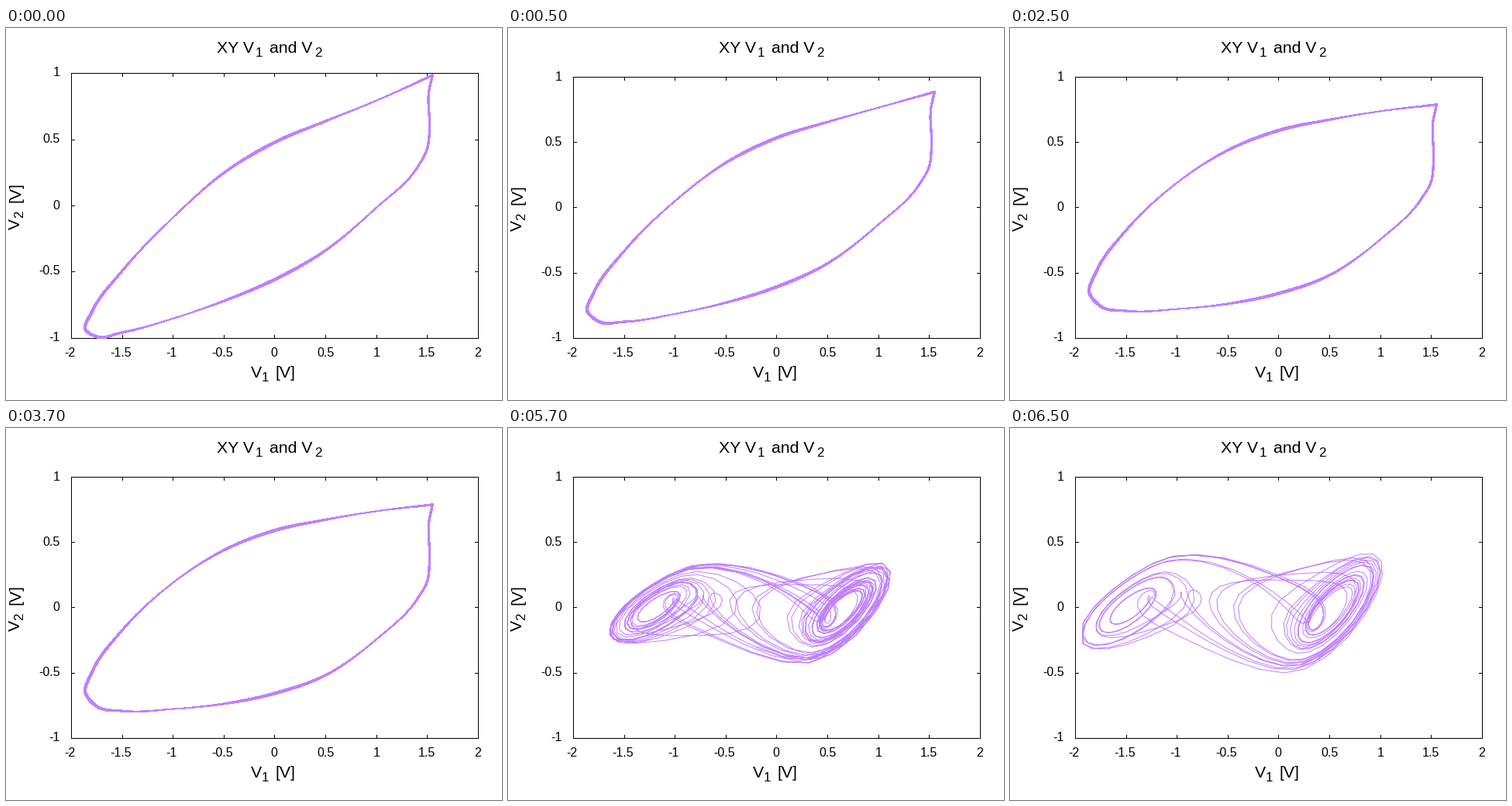
A matplotlib script that plays this animation: 640 px wide and 480 px high, repeating every 8 s.

```python
import numpy as np
import matplotlib.pyplot as plt
from matplotlib.animation import FuncAnimation
from matplotlib.collections import LineCollection

W, H, DPI = 640, 480, 100
PX = 72 / DPI
PURPLE = "#c080ff"
LEFT, RIGHT, BOTTOM = 84, 609, 400
STEP = 500
STARTS = [0, 500, 2500, 4500, 6500]
BIG, SUB, SMALL = 21.33, 17, 16

# Limit cycle: V1, then V2 at amplitude 0.8 and at amplitude 1.0.
CYCLE = np.array([
    (1.55, .79, .985), (1, .74, .795), (.5, .675, .64), (0, .593, .48),
    (-.5, .442, .25), (-1, .193, -.087), (-1.5, -.17, -.49),
    (-1.8, -.495, -.80), (-1.865, -.645, -.93), (-1.76, -.75, -.985),
    (-1.5, -.79, -.955), (-1, -.775, -.85), (-.5, -.735, -.717),
    (0, -.655, -.555), (.5, -.515, -.335), (1, -.24, -.012),
    (1.4, .068, .29), (1.5, .21, .44), (1.52, .365, .56),
    (1.515, .66, .87), (1.55, .79, .985)])

plt.rcParams["font.family"] = "Liberation Sans"
fig = plt.figure(figsize=(W / DPI, H / DPI), dpi=DPI, facecolor="white")
ax = fig.add_axes([0, 0, 1, 1])
ax.set(xlim=(0, W), ylim=(H, 0))
ax.axis("off")


def to_px(v1, v2, top):
    x = LEFT + (v1 + 2) / 4 * (RIGHT - LEFT)
    y = BOTTOM - (v2 + 1) / 2 * (BOTTOM - top)
    return x + .5, y + .5


def line(x, y, color="black"):
    return ax.plot(x, y, color=color, lw=PX)[0]


def text(x, y, s, size, **kw):
    return ax.text(x, y, s, fontsize=size * PX, color="black",
                   va="baseline", **kw)


def smooth(p, per=10):
    """Hermite curve through points, spaced by chord length."""
    gaps = np.hypot(*np.diff(p, axis=0).T)
    slope = np.gradient(p, np.r_[0, np.cumsum(gaps)], axis=0)
    u = np.linspace(0, 1, per, endpoint=False)[None, :, None]
    h = gaps[:, None, None]
    a, b = p[:-1, None], p[1:, None]
    ma, mb = slope[:-1, None] * h, slope[1:, None] * h
    curve = ((2*u**3 - 3*u**2 + 1) * a + (u**3 - 2*u**2 + u) * ma
             + (3*u**2 - 2*u**3) * b + (u**3 - u**2) * mb)
    return np.vstack([curve.reshape(-1, 2), p[-1:]])


def orbit(amplitude, top):
    """Limit cycle whose stroke swells and thins along V1."""
    v1, low, high = CYCLE.T
    v2 = low + (high - low) * (amplitude - .8) / .2
    c = smooth(np.column_stack([v1, v2]))
    xy = np.column_stack(to_px(*c.T, top))
    widths = 2.2 + 1.1 * np.cos(np.pi * c[:-1, 0])
    return [ax.add_collection(LineCollection(
        np.stack([xy[:-1], xy[1:]], axis=1), colors=PURPLE,
        linewidths=widths * PX, capstyle="round", antialiaseds=False))]


def chua_run(duration, dt=.02, alpha=15.6, beta=28, m0=-8/7, m1=-5/7):
    """Double-scroll trajectory (x, y) of Chua's circuit by RK4."""
    def rate(s):
        x, y, z = s
        f = m1 * x + (m0 - m1) / 2 * (abs(x + 1) - abs(x - 1))
        return np.array([alpha * (y - x - f), x - y + z, -beta * y])

    s, path = np.array([.7, 0, 0]), []
    for _ in range(int(duration / dt)):
        k1 = rate(s)
        k2 = rate(s + dt / 2 * k1)
        k3 = rate(s + dt / 2 * k2)
        k4 = rate(s + dt * k3)
        s = s + dt / 6 * (k1 + 2 * k2 + 2 * k3 + k4)
        path.append(s[:2])
    return np.array(path[1000:])


def scroll(path, count, stride, bias, center, half, low, high, top,
           floor=-2):
    """Stretch of the trajectory that leans to one lobe by a given bias."""
    x = path[:, 0] / np.abs(path[:, 0]).max()
    y = path[:, 1] * (1 + .2 * x)
    y = np.where(y > 0, high * y / y.max(), low * y / y.min())
    means = np.convolve(x, np.ones(count) / count, mode="valid")
    start = np.argmin(np.abs(means - bias))
    part = slice(start, start + count, stride)
    v1 = np.maximum(center + half * x[part], floor)
    return [line(*to_px(v1, y[part], top), PURPLE)]


def static_axes():
    for x, y, s, size in [(272, 32, "XY V", BIG), (322, 37, "1", SUB),
                          (339.5, 32, "and V", BIG), (398, 37, "2", SUB),
                          (316, 451, "V", BIG), (330, 456, "1", SUB),
                          (347.5, 451, "[V]", BIG)]:
        text(x, y, s, size)
    for i in range(9):
        v = -2 + i / 2
        x = LEFT + round((RIGHT - LEFT) * i / 8)
        text(x - (2 if v < 0 else 0), 423.5, f"{v:g}", SMALL, ha="center")


def scaled_axes(top):
    """Frame, ticks and vertical labels for a given top edge."""
    art = [line([LEFT, RIGHT, RIGHT, LEFT, LEFT],
                [top, top, BOTTOM, BOTTOM, top])]
    for i in range(1, 8):
        x = LEFT + round((RIGHT - LEFT) * i / 8)
        art += [line([x, x], [top, top + 4]),
                line([x, x], [BOTTOM - 4, BOTTOM])]
    for i in range(5):
        y = top + round((BOTTOM - top) * i / 4)
        art += [line([LEFT, LEFT + 4], [y, y]),
                line([RIGHT - 4, RIGHT], [y, y]),
                text(69.5, y + 4.5, f"{1 - i / 2:g}", SMALL, ha="right")]
    mid = (top + BOTTOM) / 2
    for x, dy, s, size in [(18, 31, "V", BIG), (22, 16, "2", SUB),
                           (18, -4, "[V]", BIG)]:
        art.append(text(x, mid + dy, s, size, rotation=90,
                        rotation_mode="anchor"))
    return art


static_axes()
TALL, SHORT = 58, 63
tall, short = scaled_axes(TALL), scaled_axes(SHORT)
path = chua_run(400)
scenes = [
    tall + orbit(1.0, TALL),
    short + orbit(.9, SHORT),
    short + orbit(.8, SHORT),
    short + scroll(path, 4000, 5, .1, -.265, 1.385, -.43, .35, SHORT),
    short + scroll(path, 2500, 4, .3, -.47, 1.49, -.5, .42, SHORT,
                   floor=-1.93),
]


def update(frame):
    current = np.searchsorted(STARTS, frame * STEP, side="right") - 1
    for scene in scenes:
        for artist in scene:
            artist.set_visible(False)
    for artist in scenes[current]:
        artist.set_visible(True)
    return scenes[current]


anim = FuncAnimation(fig, update, frames=16, interval=STEP, repeat=True,
                     repeat_delay=0, blit=False)
plt.show()
```
